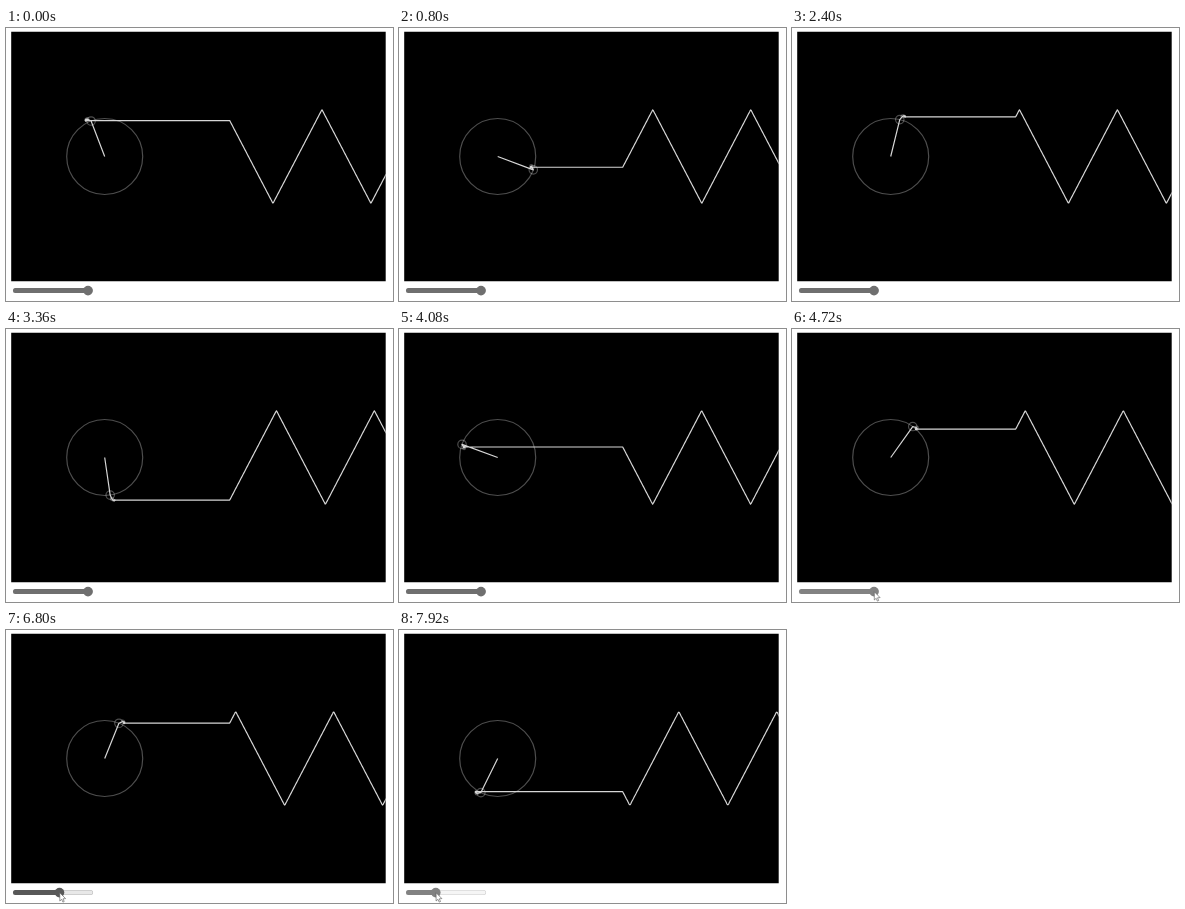
These frames come from a looping animation (387x273 px, 8 s). An HTML page with a canvas:

```html
<!DOCTYPE html>
<html>
<head>
<meta charset="utf-8">
<style>
  html, body { margin: 0; height: 100%; overflow: hidden; background: #fff; }
  canvas { display: block; }
</style>
</head>
<body>
<canvas id="stage" width="387" height="273"></canvas>
<script>
const g = document.getElementById('stage').getContext('2d');
const LOOP = 8000, STEP = 80;
const LEFT = 5.2, TOP = 3.8, RIGHT = 379.7, BOTTOM = 253.3;
const CX = 98.7, CY = 128.5, R = 38;      // main circle
const WAVE_X = 223.7, WAVE_LEN = 97.95;   // wave start and period

// Progress from 0 to 1 between two times
const ramp = (t, from, to) => Math.min(1, Math.max(0, (t - from) / (to - from)));

// Steady turn with a short catch-up after the first drag
const turn = t => (249 + 0.1645 * t + 4.4 * ramp(t, 5680, 6800)) * Math.PI / 180;

// Two drags to the left
const thumbX = t => 82 - 28.5 * ramp(t, 4880, 5520) - 16.7 * ramp(t, 7200, 7840);

// Term i of the triangle series: signed radius and frequency
function term(i) {
  const k = 2 * i + 1;
  return [(i % 2 ? -R : R) / (k * k), k];
}

function height(angle, n) {
  let y = CY;
  for (let i = 0; i < n; i++) {
    const [r, k] = term(i);
    y += r * Math.sin(k * angle);
  }
  return y;
}

function stroke(color, width) {
  g.strokeStyle = color;
  g.lineWidth = width;
  g.stroke();
}

function drawSeries(angle, n) {
  g.save();
  g.beginPath();
  g.rect(LEFT, TOP, RIGHT - LEFT, BOTTOM - TOP);
  g.fillStyle = '#000';
  g.fill();
  g.clip();
  g.lineJoin = 'round';

  let x = CX, y = CY;
  const arm = [[x, y]];
  for (let i = 0; i < n; i++) {
    const [r, k] = term(i);
    g.beginPath();
    g.arc(x, y, Math.abs(r), 0, 7);
    stroke('rgba(255,255,255,.3)', 1.2);
    x += r * Math.cos(k * angle);
    y += r * Math.sin(k * angle);
    arm.push([x, y]);
  }

  g.beginPath();
  for (const p of arm) g.lineTo(...p);
  for (let wx = WAVE_X; wx < RIGHT + 1; wx += 0.6235)
    g.lineTo(wx, height(angle - (wx - WAVE_X) / WAVE_LEN * 2 * Math.PI, n));
  stroke('#d6d6d6', 1.2);
  g.restore();
}

function bar(x, y, w, h, color) {
  g.beginPath();
  g.roundRect(x, y, w, h, h / 2);
  g.fillStyle = color;
  g.fill();
}

function drawSlider(x, t) {
  const pressed = t >= 4560 && t < 5520 || t >= 7200;
  const hover = t >= 4320;
  const color = pressed ? '#828282' : hover ? '#585858' : '#6f6f6f';
  bar(7, 260.1, 80, 5, pressed ? '#cbcbcb' : '#b8b8b8');
  bar(7.5, 260.6, 79, 4, pressed ? '#f5f5f5' : '#e8e8e8');
  bar(7, 260.1, x - 7, 5, color);
  bar(x - 4.8, 257.8, 9.6, 9.6, color);
}

function drawPointer(x, y) {
  g.save();
  g.translate(x, y);
  g.fillStyle = '#fff';
  const shape = new Path2D('M0 0V8.2L1.9 6.5 3.1 9.3 4.4 8.7 3.2 6 5.8 5.8Z');
  g.fill(shape);
  g.strokeStyle = '#555';
  g.lineWidth = 0.6;
  g.stroke(shape);
  g.restore();
}

function draw(now) {
  const t = Math.floor(now % LOOP / STEP) * STEP;
  const thumb = thumbX(t);
  const terms = Math.round(1 + 0.7 * (thumb - 12));
  g.fillStyle = '#fff';
  g.fillRect(0, 0, 387, 273);
  drawSeries(turn(t), terms);
  drawSlider(thumb, t);
  const away = 1 - ramp(t, 4080, 4320);
  drawPointer(thumb + 0.3 + 10 * away, 262.8 + 13 * away);
}

function tick() {
  draw(performance.now());
  requestAnimationFrame(tick);
}
tick();
</script>
</body>
</html>
```
